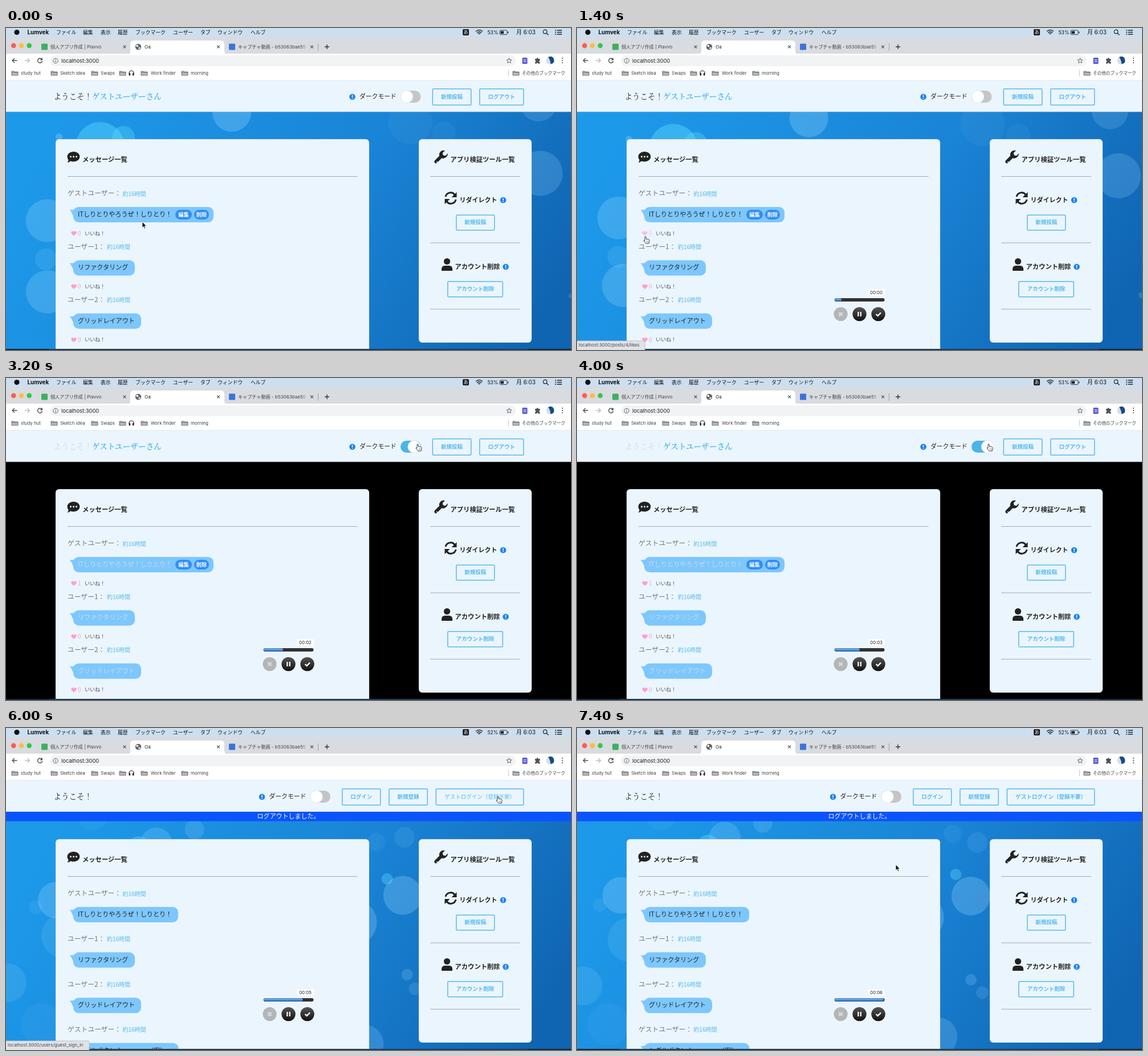
An HTML page that plays this animation: 991 px wide and 565 px high, repeating every 7.5 s.

```html
<!DOCTYPE html>
<html lang="ja">
<head>
<meta charset="utf-8">
<title>メッセージ一覧</title>
<style>
html, body { margin: 0; width: 100%; height: 100%; overflow: hidden; background: #fff; }
svg { display: block; width: 991px; height: 565px; }
text { font-family: Inter, 'Noto Sans CJK JP', 'Noto Sans CJK', sans-serif; white-space: pre; }
.page text { font-family: 'Noto Sans CJK JP', 'Noto Sans CJK', sans-serif; }
.page .welcome { font-family: 'Noto Serif CJK JP', 'Noto Sans CJK JP', 'Noto Sans CJK', serif; }
</style>
</head>
<body>
<svg id="stage" viewBox="0 0 991 565" xmlns="http://www.w3.org/2000/svg"></svg>
<script>
const LOOP = 7500, DARK_AT = 3000, LOGOUT_AT = 5900, LIKE_AT = 1700;
const SKY = '#54bbea', INK = '#222', PANEL = '#ebf5fd', GREY = '#5f6368';

const text = (x, cy, size, str, fill = '#222', extra = '') =>
  `<text x="${x}" y="${cy + size * .37}" font-size="${size}" fill="${fill}" ${extra}>${str}</text>`;
const centred = (x, cy, size, str, fill, extra = '') => text(x, cy, size, str, fill, `text-anchor="middle" ${extra}`);
const rect = (x, y, w, h, fill, r = 0, extra = '') =>
  `<rect x="${x}" y="${y}" width="${w}" height="${h}" rx="${r}" fill="${fill}" ${extra}/>`;
const circle = (x, y, r, fill, extra = '') => `<circle cx="${x}" cy="${y}" r="${r}" fill="${fill}" ${extra}/>`;
const path = (d, fill, extra = '') => `<path d="${d}" fill="${fill}" ${extra}/>`;
const line = (d, colour, width = 1, extra = '') => path(d, 'none', `stroke="${colour}" stroke-width="${width}" ${extra}`);
const group = (content, attrs = '') => `<g ${attrs}>${content}</g>`;
const at = (x, y, content, attrs = '') => group(content, `transform="translate(${x} ${y})" ${attrs}`);

// Browser window
const folder = x => at(x, 75, path('M0 1h4l1 1h6v6H0z', '#b9bcc1', `stroke="${GREY}" stroke-width=".9"`) + line('M0 3.2h11', GREY, .8));
const cross = (x, y) => line(`M${x - 2.4} ${y - 2.4}l4.8 4.8m0-4.8l-4.8 4.8`, '#45484c', 1.1);

function menuBar() {
  const items = [[88, 'ファイル'], [135, '編集'], [166, '表示'], [196, '履歴'], [227, 'ブックマーク'],
    [293, 'ユーザー'], [341, 'タブ'], [371, 'ウィンドウ'], [429, 'ヘルプ']];
  return rect(0, 0, 991, 24, '#cbdff0') + circle(19, 7.5, 4.6, '#111') +
    text(37.5, 7.5, 9.8, 'Lumvek', '#111', 'font-weight="700"') +
    items.map(([x, label]) => text(x, 7.5, 8.8, label, '#111')).join('') +
    rect(801, 2, 11, 11, '#1c1c1c', 2) + centred(806.5, 7.5, 8, 'あ', '#fff') +
    line('M824 6q6-5 12 0M826 8.5q4-3.5 8 0M828.3 10.5q1.7-1.4 3.4 0', '#1c1c1c', 1.4) +
    text(844.5, 7.5, 8.6, '', '#111', 'id="battery"') +
    rect(866, 4, 13, 7.5, 'none', 2, 'stroke="#222" stroke-width=".9"') + rect(867.5, 5.5, 5.5, 4.5, '#222') +
    rect(880, 6.3, 1.2, 3, '#222') + text(895, 7.5, 9.8, '月 6:03', '#111') +
    circle(945.5, 6.5, 3.3, 'none', 'stroke="#222" stroke-width="1.2"') + line('M948 9l3.5 3.5', '#222', 1.3) +
    line('M963 4h2m1.5 0h8.5M963 7.5h2m1.5 0h8.5M963 11h2m1.5 0h8.5', '#222', 1.4);
}

function tabs() {
  return path('M0 24Q0 15.5 7 15.5H984Q991 15.5 991 24V46H0z', '#d8dbdf') +
    ['#fc5b57', '#fdbc40', '#34c84a'].map((c, i) => circle(13.3 + i * 13.7, 31, 4.4, c)).join('') +
    path('M212 46q6 0 6-6V28q0-6 6-6h153q6 0 6 6v12q0 6 6 6z', '#fff') +
    rect(62, 27.5, 11, 11, '#3fae63', 1.5) + text(78, 33, 8.1, '個人アプリ作成 | Plavvo', '#44474b') + cross(208, 33) +
    circle(232, 33, 5.2, GREY) + path('M228 31q3-3 4 0t-2 2l-2-1zm4 5q0-3 4-2l-2 3z', '#fff') +
    text(243, 33, 8.1, 'Oa') + cross(372.5, 33) +
    rect(391, 27.5, 11, 11, '#3b73dc', 1) +
    text(407, 33, 8.1, 'キャプチャ動画 - b53063bae55', '#44474b') +
    rect(519, 26, 9, 14, 'url(#tabFade)') + cross(536.5, 33) + line('M547.5 27v13', '#8d9196', .8) +
    line('M559 33h8m-4-4v8', '#333', 1.4);
}

function toolbar() {
  const back = line('M19.5 57h-8m3.5-4l-4 4 4 4', '#4a4d51', 1.3);
  const forward = line('M33 57h8m-3.5-4l4 4-4 4', '#b9bcc0', 1.3);
  const star = Array.from({ length: 10 }, (_, i) => {
    const a = i * Math.PI / 5, r = i % 2 ? 2.1 : 4.8;
    return `${882.5 + r * Math.sin(a)},${57.5 - r * Math.cos(a)}`;
  }).join(' ');
  const marks = [[10, 26, 'study hut'], [79, 95, 'Sketch idea'], [150, 166, 'Swaps'], [199, 0, ''],
    [237, 254, 'Work finder'], [308, 324, 'morning']];
  return rect(0, 45, 991, 47, '#fff') + rect(77, 48, 817, 19, '#f1f3f4', 9.5) + back + forward +
    line('M62.5 54.5a4 4 0 1 0 1 3.5', '#4a4d51', 1.4) + path('M64 52v4.5h-4.5z', '#4a4d51') +
    circle(87, 57.5, 4.2, 'none', `stroke="${GREY}"`) + line('M87 56.7v3M87 54.8v1', GREY, 1.1) +
    text(97, 57.3, 9.4, 'localhost:3000') +
    `<polygon points="${star}" fill="none" stroke="${GREY}" stroke-width="1"/>` +
    rect(905.5, 52, 9, 11, '#5b5bd6', 1.5) + line('M907.5 56h5m-5 3h5', '#fff', 1) +
    path('M928 54h2.5q1.5-4 3 0h3v3q-3 1.5 0 3v2.5h-3q-1.5-3-3 0H928V60q3-1.5 0-3z', '#4f5256') +
    circle(954.5, 57, 7, '#d5dfe6') + path('M951 51q8-3 10 4t-6 8q0-6-4-12z', '#164a86') +
    [53, 57, 61].map(y => circle(976, y, 1.1, '#4f5256')).join('') +
    marks.map(([fx, x, label]) => folder(fx) + text(x, 79, 7.9, label, '#3c4043')).join('') +
    line('M216 80v-1a4 4 0 0 1 8 0v1', '#222', 1.2) + rect(215.5, 79, 2.6, 4.5, '#222', 1) + rect(221.9, 79, 2.6, 4.5, '#222', 1) +
    line('M881.5 73v12', '#c6c9cd') + folder(889) + text(905, 79, 7.6, 'その他のブックマーク', '#3c4043') +
    line('M0 91.7h991', '#dfe4e8', .7);
}

// Web page
const info = (x, y) => circle(x, y, 5.3, '#1b83f2') + rect(x - .8, y - 3.2, 1.6, 3.8, '#fff') + circle(x, y + 2.5, .9, '#fff');
const button = (x, y, w, h, label, id = '') =>
  rect(x + .8, y + .8, w - 1.6, h - 1.6, 'none', 1.5, `stroke="${SKY}" stroke-width="1.5"`) +
  centred(x + w / 2, y + h / 2 - 1, 9.5, label, SKY, `font-weight="700" ${id && `id="${id}"`}`);
const rule = (x1, x2, y) => line(`M${x1} ${y}H${x2}`, '#a3a9ae', 1);
const title = (x, y, str, size = 11.3) => text(x, y, size, str, INK, 'font-weight="700"');

const toggle = (x, live) => info(x - 84.5, 120.8) + text(x - 72, 120.5, 10.8, 'ダークモード') +
  rect(x, 110, 35.5, 21, '#c5c5c5', 10.5, live ? 'id="track"' : '') +
  circle(x + 11, 120.5, 10.8, '#fff', (live ? 'id="knob"' : '') + ' stroke="#d5dade" stroke-width=".6"');

const pill = (x, w, label) => rect(x, 319, w, 17, '#2f8df7', 8.5) +
  centred(x + w / 2, 327.5, 9.3, label, '#fff', 'font-weight="700"');

const message = (name, timeX, body, width, extra = '') =>
  text(108, 290, 11.8, name + '：', '#777') + text(timeX, 291, 10, '約16時間', SKY) +
  path('M111.5 319q5 1 9-1l3 17q-5-2-7-8-2-5-5-8z', '#7dc7fd') + rect(118, 314, width, 27, '#7dc7fd', 9.5) +
  text(126, 327, 11.1, body, INK, 'class="body"') + extra;

const likes = (id = '') => group(
  path('M119 364.8l-4.2-4.2q-1.5-3 1-4 2-.7 3.2 1.3 1.2-2 3.2-1.3 2.5 1 1 4z', '#ff9fc6') +
  text(126, 360.3, 10, '0', '#ff9fc6', id && 'id="count"'), id && `id="${id}"`) + text(138, 360.3, 9, 'いいね！', '#555');

const wrench = path('M775 220l-4.3 4.3-4-1-1-4 4.3-4.2q-5-1.5-8 2t-1.8 7.2l-8.2 8.2q-1.5 2 0 4t4 0l8.2-8.2q4 1.5 7.5-1.5t3.3-6.8z', INK) +
  circle(756, 235, 1, PANEL);
const sync = line('M771 296a9 9 0 0 1 16-3.5M789 301a9 9 0 0 1-16 3.5', INK, 3) +
  path('M790.5 288v9h-9zM769.5 309v-9h9z', INK);
const person = circle(773.5, 409.5, 5.6, INK) + path('M764 426v-3q0-6 6-6h7q6 0 6 6v3z', INK);
const speech = path('M118.5 217c6 0 10.8 3.8 10.8 8.7s-4.8 8.7-10.8 8.7q-3 0-5.5-1-2.5 2.6-5.5 2.6 2-2 2-4.8-2-2.2-2-5.5c0-4.9 5-8.7 11-8.7z', INK) +
  [113.5, 118.5, 123.5].map(x => circle(x, 225.7, 1.5, PANEL)).join('');

function panels() {
  const edge = 'stroke="#8d9ba6" stroke-opacity=".35" stroke-width=".8"';
  return rect(87, 195, 550, 390, PANEL, 6, edge) + rect(724, 195, 198, 357, PANEL, 6, edge) +
    speech + title(134, 230.5, 'メッセージ一覧') + rule(108, 616.5, 260.5) +
    wrench + title(779.5, 230.5, 'アプリ検証ツール一覧') + rule(744, 902, 260.5) +
    sync + title(795.5, 302, 'リダイレクト', 11) + info(872, 302) + button(789, 327.5, 68.5, 28, '新規投稿') + rule(744, 902, 377) +
    person + title(787.5, 419, 'アカウント削除') + info(876.5, 419) + button(774, 444, 98, 28.5, 'アカウント削除') + rule(744, 902, 493.3);
}

function memberView() {
  return text(83.5, 120, 13.5, 'ようこそ！', INK, 'id="hello" class="welcome"') +
    text(151, 120, 13.65, 'ゲストユーザーさん', SKY, 'font-weight="700" class="welcome"') +
    toggle(692, true) + button(747.5, 106, 69, 30, '新規投稿') + button(830, 106, 78.5, 30, 'ログアウト', 'logout') +
    message('ゲストユーザー', 204.5, 'ITしりとりやろうぜ！しりとり！', 246, pill(297, 29, '編集') + pill(330, 26, '削除') + likes('like')) +
    at(0, 93.4, message('ユーザー1', 177, 'リファクタリング', 108, likes())) +
    at(0, 186.8, message('ユーザー2', 177, 'グリッドレイアウト', 119, likes()));
}

function visitorView() {
  const rows = [['ゲストユーザー', 204.5, 'ITしりとりやろうぜ！しりとり！', 184], ['ユーザー1', 177, 'リファクタリング', 108],
    ['ユーザー2', 177, 'グリッドレイアウト', 119], ['ゲストユーザー', 204.5, 'トグルボタン！ーーーー（案）', 184.5]];
  return text(83.5, 120, 13.5, 'ようこそ！', INK, 'class="welcome"') + toggle(533.5, false) +
    button(589, 106, 68.5, 30, 'ログイン') + button(671, 106, 69, 30, '新規登録') +
    button(753.5, 106, 155, 30, 'ゲストログイン（登録不要）', 'guest') +
    rect(0, 147, 991, 16.5, '#0b53fb') + centred(495.5, 155.3, 11, 'ログアウトしました。', '#fff') +
    rows.map((row, i) => at(0, i * 79.6, message(...row))).join('');
}

// Each bubble: x, y, speed x, speed y (px/s), radius, opacity
const memberBubbles = [
  [396, 148, 7.6, 6.9, 34, .27], [165, 208, 3, 2.3, 43, .4], [206, 192, 1.5, 7.5, 20, .33], [93, 191, -1.5, 3, 6, .3],
  [72, 338, .8, -3.4, 37.5, .24], [70, 406, 1.6, -3.3, 19, .13], [73, 463, 6.2, -8, 38, .24],
  [709, 165, 1.8, 2.4, 39, .05], [768, 185, 4.5, 2.3, 21, .05], [934, 132, .6, 9.8, 32, .16], [937, 255, 9, 3, 39.5, .2],
  [992, 470, -1.5, -.8, 5, .2]];
const visitorBubbles = [
  [150, 150, -3, 0, 29, .06], [262, 199, -3.3, -7, 28, .2], [329, 174, -3.3, -8, 17, .16], [232, 209, -2, -2, 20, .35],
  [84, 299, -8, -6, 32, .25], [48, 313, -9, -3, 12, .1], [98, 367, -6, 5, 39, .13], [5, 449, 6, 4, 34, .14],
  [60, 520, -5, 0, 37, .06], [667, 262, -3, -5.5, 10, .35], [694, 294, -3.5, 1, 34, .26], [653, 195, 6.5, -10, 16, .07],
  [700, 195, 2.5, 6.5, 18, .1], [699, 436, -9, 6.5, 10, .2], [715, 460, -4.5, 5, 11, .15], [608, 338, -5, -6, 40, .25],
  [630, 550, 3.5, -9, 34, .2]];
const bubbleGroup = list => list.map(([, , , , r, o]) => circle(0, 0, r, o > .3 ? '#62dcff' : '#a5dcff', `opacity="${o}"`)).join('');

// Recorder controls and pointers
const knobButton = (x, fill, icon) => circle(x, 502, 13.3, '#fff', 'opacity=".8"') + circle(x, 502, 12.3, fill) + icon;
const recorder = rect(510.5, 458, 29.5, 11.5, '#fff', 2) + centred(525, 463.7, 7.8, '', '#222', 'id="clock"') +
  rect(450.5, 473, 90, 8, '#fff', 3.5, 'opacity=".85"') + rect(451.5, 474, 88, 6, '#303236', 3) +
  rect(452, 474.5, 1, 5, 'url(#progress)', 2.3, 'id="bar"') +
  knobButton(462.5, '#b3b6b8', line('M459.5 499l6 6m0-6l-6 6', '#d7d9da', 2.8)) +
  knobButton(495.5, 'url(#knobDark)', line('M493.3 498v8m4.4-8v8', '#fff', 2.2)) +
  knobButton(528.5, 'url(#knobDark)', line('M524.5 502l3 3 5.5-5.5', '#fff', 2.3));
const arrowCursor = path('M0 0v10.5l2.5-2.2 1.7 3.9 1.7-.7-1.7-3.8h3.2z', '#111', 'stroke="#fff" stroke-width=".8"');
const handCursor = path('M-1 1q1-1.5 2 0l.6 4q3-.6 4.8.8 1 .8.5 3l-.9 3.7H1L-2.8 8q-.8-1.6 1.8-.5z', '#fff', 'stroke="#222" stroke-width=".9"') +
  line('M2.5 8v2.5m2-2.5v2.5', '#222', .6);

const stage = document.getElementById('stage');
stage.innerHTML = `<defs>
  <linearGradient id="sea" x1="0" y1=".4" x2="1" y2=".65"><stop offset="0" stop-color="#1d99e9"/><stop offset=".55" stop-color="#1a84d6"/><stop offset="1" stop-color="#1065b2"/></linearGradient>
  <linearGradient id="progress" x2="0" y2="1"><stop stop-color="#7dc0fa"/><stop offset="1" stop-color="#1d6fd0"/></linearGradient>
  <linearGradient id="knobDark" x2="0" y2="1"><stop stop-color="#555"/><stop offset="1" stop-color="#111"/></linearGradient>
  <linearGradient id="tabFade"><stop stop-color="#d8dbdf" stop-opacity="0"/><stop offset="1" stop-color="#d8dbdf"/></linearGradient>
  </defs>` +
  group(rect(0, 147, 991, 418, 'url(#sea)') +
    group(bubbleGroup(memberBubbles), 'id="memberBubbles"') + group(bubbleGroup(visitorBubbles), 'id="visitorBubbles"') +
    rect(0, 147, 991, 418, '#000', 0, 'id="night"') + rect(0, 92, 991, 55, PANEL) + line('M0 147h991', '#b9c6cf', .7) +
    panels() + group(memberView(), 'id="member"') + group(visitorView(), 'id="visitor"'), 'class="page"') +
  menuBar() + tabs() + toolbar() +
  rect(0, 563, 991, 2, '#10283f') + rect(75, 563, 841, 2, '#1d3c5c') +
  group(rect(-1, 549, 100, 17, '#dfe2e6', 2, 'id="statusBox" stroke="#b6babd" stroke-width=".8"') +
    text(3, 556.3, 7.9, '', '#44474b', 'id="statusText"'), 'id="status"') +
  group(recorder, 'id="recorder"') + group(arrowCursor, 'id="arrow"') + group(handCursor, 'id="hand"');

const ui = Object.fromEntries([...stage.querySelectorAll('[id]')].map(el => [el.id, el]));
const bodies = ui.member.querySelectorAll('.body');
const show = (el, on) => el.setAttribute('visibility', on ? 'visible' : 'hidden');
const within = (t, a, b) => t >= a && t < b;
const clamp = v => Math.min(1, Math.max(0, v));
const ease = v => v * v * (3 - 2 * v);

const pointerPath = [[0, 239, 340], [500, 239, 340], [1200, 120, 365.5], [1800, 120, 365.5], [2600, 725, 111.5],
  [2900, 722, 115.5], [4300, 722, 115.5], [5000, 863, 119.5], [6000, 863, 119.5], [6500, 562, 236.5], [7400, 559, 239.5]];
const statuses = [[1150, 1850, 'posts/4/likes', 120], [4850, LOGOUT_AT, 'users/sign_out', 127], [LOGOUT_AT, 6700, 'users/guest_sign_in', 147]];

function pointerAt(t) {
  const next = pointerPath.findIndex(p => p[0] > t);
  const b = pointerPath.at(next), a = next > 0 ? pointerPath[next - 1] : b;
  const k = a === b ? 0 : ease((t - a[0]) / (b[0] - a[0]));
  return `translate(${a[1] + (b[1] - a[1]) * k} ${a[2] + (b[2] - a[2]) * k})`;
}

function drift(el, list, seconds) {
  list.forEach(([x, y, vx, vy], i) => {
    el.children[i].setAttribute('cx', x + vx * seconds);
    el.children[i].setAttribute('cy', y + vy * seconds);
  });
}

function draw(t) {
  const loggedOut = t >= LOGOUT_AT, dark = within(t, DARK_AT, LOGOUT_AT);
  show(ui.member, !loggedOut);
  show(ui.visitor, loggedOut);
  show(ui.memberBubbles, !loggedOut);
  show(ui.visitorBubbles, loggedOut);
  drift(ui.memberBubbles, memberBubbles, t / 1000);
  drift(ui.visitorBubbles, visitorBubbles, (t - 6500) / 1000);

  show(ui.night, dark);
  ui.hello.setAttribute('fill', dark ? '#d3d6d9' : INK);
  bodies.forEach(el => el.setAttribute('fill', dark ? '#cdd9e3' : INK));
  const slide = ease(clamp((t - DARK_AT) / 300));
  ui.track.setAttribute('fill', dark ? '#4cb5e6' : '#c5c5c5');
  ui.knob.setAttribute('cx', 703 + 17 * slide);

  ui.like.setAttribute('opacity', within(t, 1150, 1850) ? .6 : 1);
  ui.count.textContent = t >= LIKE_AT ? '1' : '0';
  ui.logout.setAttribute('opacity', t >= 4850 ? .65 : 1);
  ui.guest.setAttribute('opacity', t < 6600 ? .65 : 1);
  ui.battery.textContent = loggedOut ? '52%' : '53%';

  const status = statuses.find(([from, to]) => within(t, from, to));
  show(ui.status, !!status);
  if (status) {
    ui.statusText.textContent = 'localhost:3000/' + status[2];
    ui.statusBox.setAttribute('width', status[3]);
  }

  show(ui.recorder, t >= 500);
  ui.clock.textContent = '00:0' + Math.max(0, Math.floor((t - 650) / 1000));
  ui.bar.setAttribute('width', Math.max(0, (t - 430) * .0123));

  const overLink = within(t, 1150, 1900) || within(t, 2500, 4450) || within(t, 4800, 6100);
  show(ui.hand, overLink);
  show(ui.arrow, !overLink);
  (overLink ? ui.hand : ui.arrow).setAttribute('transform', pointerAt(t));
}

const start = performance.now();
function tick() {
  const t = (performance.now() - start) % LOOP;
  draw(Math.floor(t / 100) * 100);
  requestAnimationFrame(tick);
}
draw(0);
requestAnimationFrame(tick);
</script>
</body>
</html>
```
